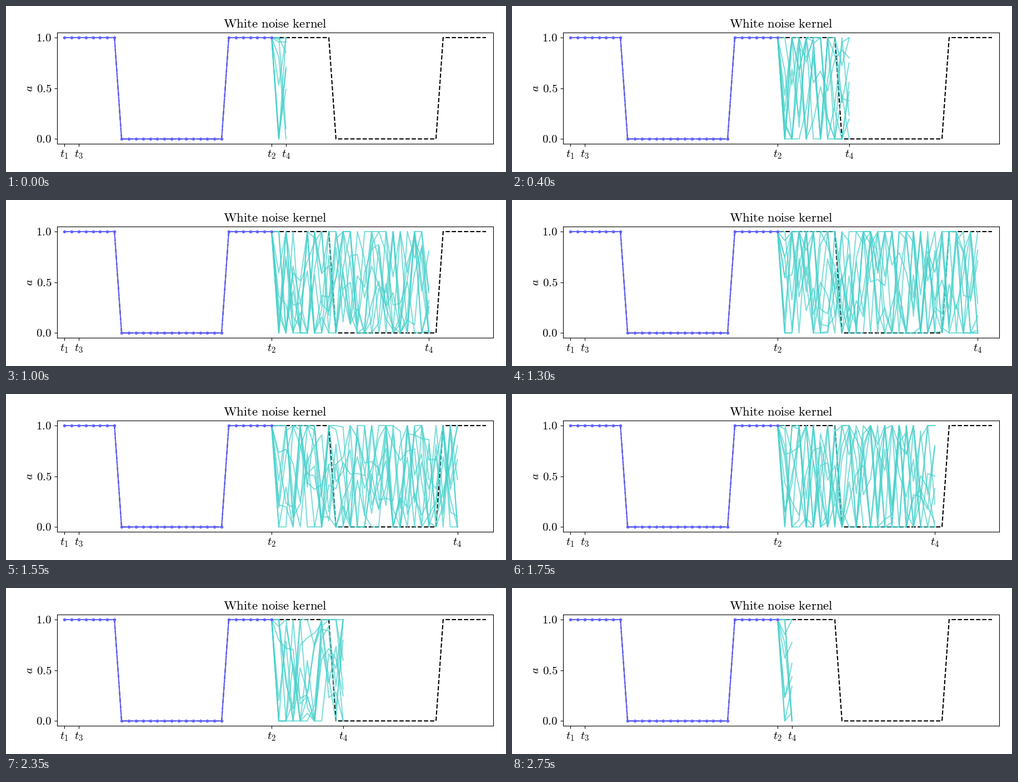
A matplotlib script for the animation above (2800 ms loop, 900 px wide and 300 px high).

```python
import numpy as np
import matplotlib.pyplot as plt
from matplotlib.animation import FuncAnimation

W, H, DPI = 900, 300, 100
LEFT, RIGHT, TOP, BOTTOM = 92.3, 876.9, 47.9, 249.4
FRAMES, PATHS, NOW = 56, 10, 29
STEP = (RIGHT - LEFT) / 61
BLUE, TEAL = "#6464ff", "#48d1cc"

plt.rcParams["mathtext.fontset"] = "cm"


def signal(i):
    phase = i % 30
    return np.where((phase >= 8) & (phase <= 22), 0.0, 1.0)


def x_px(i):
    return LEFT + (i + 1) * STEP


def y_px(value):
    return BOTTOM - (value + 0.05) / 1.1 * (BOTTOM - TOP)


def label(x, y, text, size=15, **kw):
    """Place text with its baseline at a pixel position measured from the top."""
    return fig.text(x, H - y, text, fontsize=size, va="baseline",
                    transform=None, **kw)


def horizon(frame):
    """Steps predicted ahead: grows to the middle of the loop, then shrinks."""
    return min(frame + 2, FRAMES + 1 - frame)


def sample(frame):
    """White noise paths, clipped to the unit range, starting at the last point."""
    rng = np.random.default_rng(100 + frame)
    noise = rng.normal(0.5, 0.65, (PATHS, horizon(frame)))
    return np.hstack([np.ones((PATHS, 1)), np.clip(noise, 0, 1)])


fig = plt.figure(figsize=(W / DPI, H / DPI), dpi=DPI, facecolor="white")
ax = fig.add_axes([LEFT / W, 1 - BOTTOM / H,
                   (RIGHT - LEFT) / W, (BOTTOM - TOP) / H])
ax.set_xlim(-1, 60)
ax.set_ylim(-0.05, 1.05)
ax.set_yticks([0, 0.5, 1], [""] * 3)

whole, past = np.arange(60), np.arange(NOW + 1)
ax.plot(whole, signal(whole), "k--", lw=1.5, zorder=2)
paths = [ax.plot([], [], color=TEAL, lw=1.5, alpha=0.7, zorder=3)[0]
         for _ in range(PATHS)]
ax.plot(past, signal(past), color=BLUE, lw=1.5, marker=".", zorder=4)

label(484.5, 39, r"$\mathrm{White\ noise\ kernel}$", 16.5, ha="center")
label(47.5, 149, "$a$", ha="center", rotation=90, rotation_mode="anchor")
for value in (0, 0.5, 1):
    label(82.3, y_px(value) + 7, rf"$\mathrm{{{value:.1f}}}$", ha="right")
for i, name in ((0, "$t_1$"), (2, "$t_3$"), (NOW, "$t_2$")):
    label(x_px(i), 273.7, name, ha="center")
end_label = label(0, 273.7, "$t_4$", ha="center")


def update(frame):
    end = NOW + horizon(frame)
    x = np.arange(NOW, end + 1)
    for line, y in zip(paths, sample(frame)):
        line.set_data(x, y)
    ax.set_xticks([0, 2, NOW, end], [""] * 4)
    end_label.set_x(x_px(end))
    return paths + [end_label]


anim = FuncAnimation(fig, update, frames=FRAMES, interval=50,
                     repeat=True, repeat_delay=0, blit=False)
plt.show()
```
